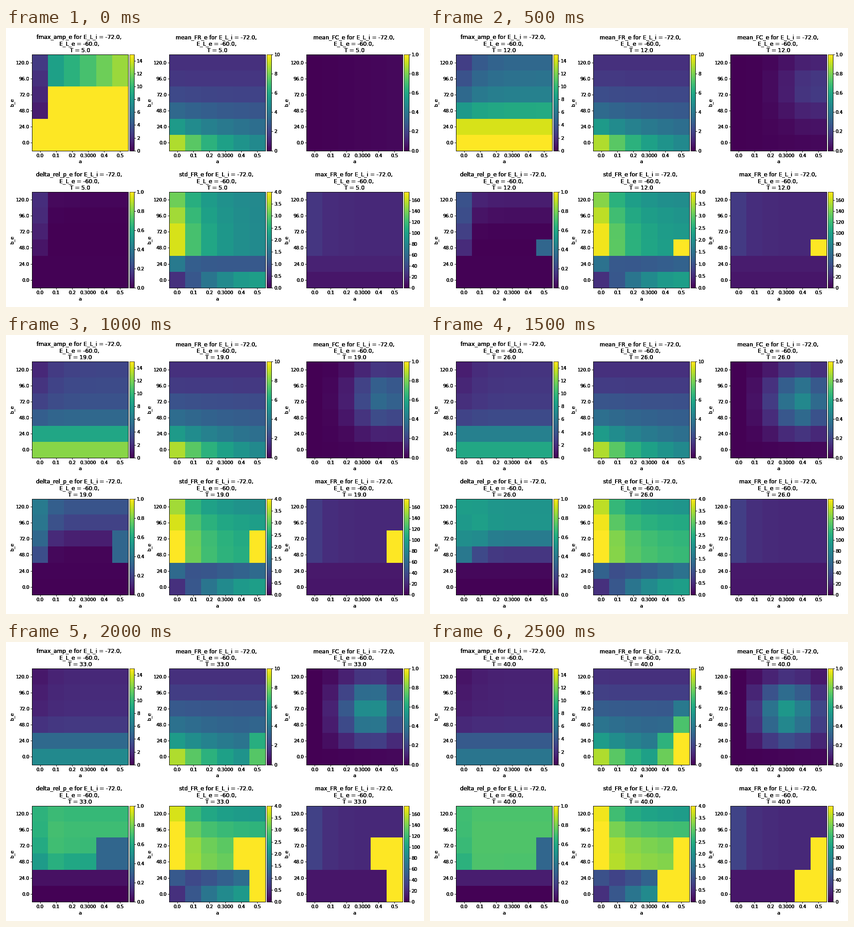
Write a matplotlib script that moves like this. It is 917x611 px and loops after 3000 ms.

```python
import numpy as np
import matplotlib.pyplot as plt
from matplotlib.animation import FuncAnimation

W, H, DPI = 917, 611, 61.13
PT = DPI / 72           # pixels per point
SIDE = 210.6            # side of one heatmap, px
BAR_GAP, BAR_W = 0.05 * DPI, 0.05 * SIDE
LAYERS = 5              # labels are overprinted, which makes them heavier
STEPS = 6

A_LABELS = ["0.0", "0.1", "0.2", "0.3000", "0.4", "0.5"]
B_LABELS = [f"{b:.1f}" for b in range(120, -1, -24)]

# Column index of a, and row index of b_e counted from the bottom.
c, r = np.meshgrid(np.arange(6.0), np.arange(5.0, -1, -1))

# step: (first column, last column, lowest row, highest row) of unstable cells
RUNAWAY = {
    1: [(5, 5, 2, 2)],
    2: [(5, 5, 2, 3)],
    4: [(5, 5, 0, 3), (4, 4, 2, 3)],
    5: [(5, 5, 0, 3), (4, 4, 0, 1)],
}


def by_row(*points):
    """Spread one value per row, bottom row first."""
    return np.interp(r, range(6), points)


def bell(x, mid, width):
    return np.exp(-((x - mid) / width) ** 2)


def runaway(k):
    mask = np.zeros_like(c, dtype=bool)
    for c0, c1, r0, r1 in RUNAWAY.get(k, []):
        mask |= (c >= c0) & (c <= c1) & (r >= r0) & (r <= r1)
    return mask


# Each field returns a grid in fractions of its colour maximum.

def fmax_amp(k):
    """Peak power falls roughly as 1 / T, faster in the middle rows."""
    period = 5 + 7 * k
    v = by_row(1.3, 0.94, 0.61, 0.44, 0.38, 0.34)
    v = v * (12 / period) ** by_row(1, 1, 1.28, 1.2, 1.1, 1.05)
    v *= 1 - 0.45 * np.exp(-c) * np.clip((r - 1) / 4, 0, 1)
    if k == 0:
        v = np.where(r > 3, 0.5 + 0.07 * c, v)
        v = np.where((c == 0) & (r > 1), 0.02 + 0.03 * r, v)
    return v


def mean_rate(k):
    """Rate decays along a; the right-hand columns surge in the last steps."""
    floor = by_row(0.36, 0.31, 0.25, 0.195, 0.155, 0.137)
    decay = 0.52 * np.exp(-0.7 * r - 0.1 * r ** 2) * np.exp(-c / 3.3)
    drift = 0.015 * k * bell(r, 2.8, 1.2)
    s = np.clip(c + k - 8, 0, 2)
    surge = np.clip(np.minimum(0.26 * s ** 1.3, 0.18 + 0.38 * s - 0.27 * r), 0, 1)
    return floor + decay + drift + surge * (s > 0)


def connectivity(k):
    """A blob that grows while it moves to the left and down."""
    height = 0.54 * (1 - np.exp(-(k / 2) ** 1.5))
    blob = height * bell(c, 5.1 - 0.4 * k, 1.9) * bell(r, 3.6 - 0.17 * k, 1.9)
    return blob * (c > 0) * (r > 0) + 0.004 * c


def delta_power(k):
    """Each upper cell switches on along a logistic curve, lower rows later."""
    depth = 5 - r
    onset = 1.7 + 0.7 * np.tanh(c) + 0.12 * depth ** 2
    slope = 0.9 + (c > 0) * (0.6 + 0.4 * depth)
    v = 0.73 / (1 + np.exp(-slope * (k - onset)))
    v = np.where(r < 2, 0.0006 * r * k ** 3 + 0.005, v)
    return np.where(runaway(k) & (r > 1), 0.33, v)


def std_rate(k):
    high = 0.46 + (0.48 - 0.08 * np.clip(r - 3, 0, 2)) * np.exp(-0.65 * c)
    growth = 0.066 - 0.0055 * (r - 2) ** 2
    high += k * (growth * np.tanh(c / 2) + 0.04 * np.exp(-2 * c))
    second = 0.28 + 0.13 * np.exp(-2 * c) + 0.013 * k * (c - 2.5)
    bottom = 0.14 + 0.42 * np.sin(c * np.pi / 10)
    v = np.where(r > 1, high, np.where(r == 1, second, bottom))
    return np.where(runaway(k), 1, v)


def max_rate(k):
    upper = 0.115 + (0.045 + 0.008 * k) * np.exp(-1.3 * c)
    lower = 0.06 + 0.035 * r * np.exp(-0.7 * k)
    return np.where(runaway(k), 1, np.where(r > 1, upper, lower))


# name: (field, left, top, colour maximum, colourbar tick step, tick format)
LEFT, MID, RIGHT = 57.2, 358.3, 659.4
UPPER, LOWER = 58.0, 358.6
PANELS = {
    "fmax_amp_e": (fmax_amp, LEFT, UPPER, 15, 2, "%d"),
    "mean_FR_e": (mean_rate, MID, UPPER, 10, 2, "%d"),
    "mean_FC_e": (connectivity, RIGHT, UPPER, 1, 0.2, "%.1f"),
    "delta_rel_p_e": (delta_power, LEFT, LOWER, 1, 0.2, "%.1f"),
    "std_FR_e": (std_rate, MID, LOWER, 4, 0.5, "%.1f"),
    "max_FR_e": (max_rate, RIGHT, LOWER, 175, 20, "%d"),
}

plt.rcParams.update({"font.family": "DejaVu Sans", "font.size": 12})
fig = plt.figure(figsize=((W + 1e-6) / DPI, (H + 1e-6) / DPI), dpi=DPI,
                 facecolor="white")


def box(x, y, w, h):
    return [x / W, 1 - (y + h) / H, w / W, h / H]


def title_line(x, y, text):
    return fig.text(x / W, 1 - y / H, text, fontsize="large",
                    ha="center", va="baseline")


def make_panel(name):
    """Draw one heatmap with its colourbar; return the image and its T labels."""
    field, x, y, top, step, fmt = PANELS[name]
    image, stamps = None, []
    for _ in range(LAYERS):
        ax = fig.add_axes(box(x, y, SIDE, SIDE), facecolor="none")
        if image is None:
            image = ax.imshow(field(0) * top, cmap="viridis", vmin=0, vmax=top,
                              interpolation="nearest", aspect="auto")
        ax.set_xlim(-0.5, 5.5)
        ax.set_ylim(5.5, -0.5)
        ax.set_xticks(range(6), A_LABELS)
        ax.set_yticks(range(6), B_LABELS)
        ax.set_xlabel("a")
        ax.set_ylabel("b_e")
        cax = fig.add_axes(box(x + SIDE + BAR_GAP, y, BAR_W, SIDE))
        fig.colorbar(image, cax=cax, format=fmt,
                     ticks=np.arange(0, top + step / 9, step))
        mid, base = x + SIDE / 2, y - 6 * PT
        title_line(mid - 2, base - 29, f"{name} for E_L_i = -72.0,")
        title_line(mid - 2, base - 14.5, "E_L_e = -60.0,")
        stamps.append(title_line(mid, base, ""))
    return image, stamps


views = {name: make_panel(name) for name in PANELS}


def update(k):
    for name, (image, stamps) in views.items():
        field, _, _, top, _, _ = PANELS[name]
        image.set_data(field(k) * top)
        for stamp in stamps:
            stamp.set_text(f"T = {5 + 7 * k:.1f}")
    return []


anim = FuncAnimation(fig, update, frames=STEPS, interval=500, repeat=True,
                     repeat_delay=0, init_func=lambda: update(0))
plt.show()
```
